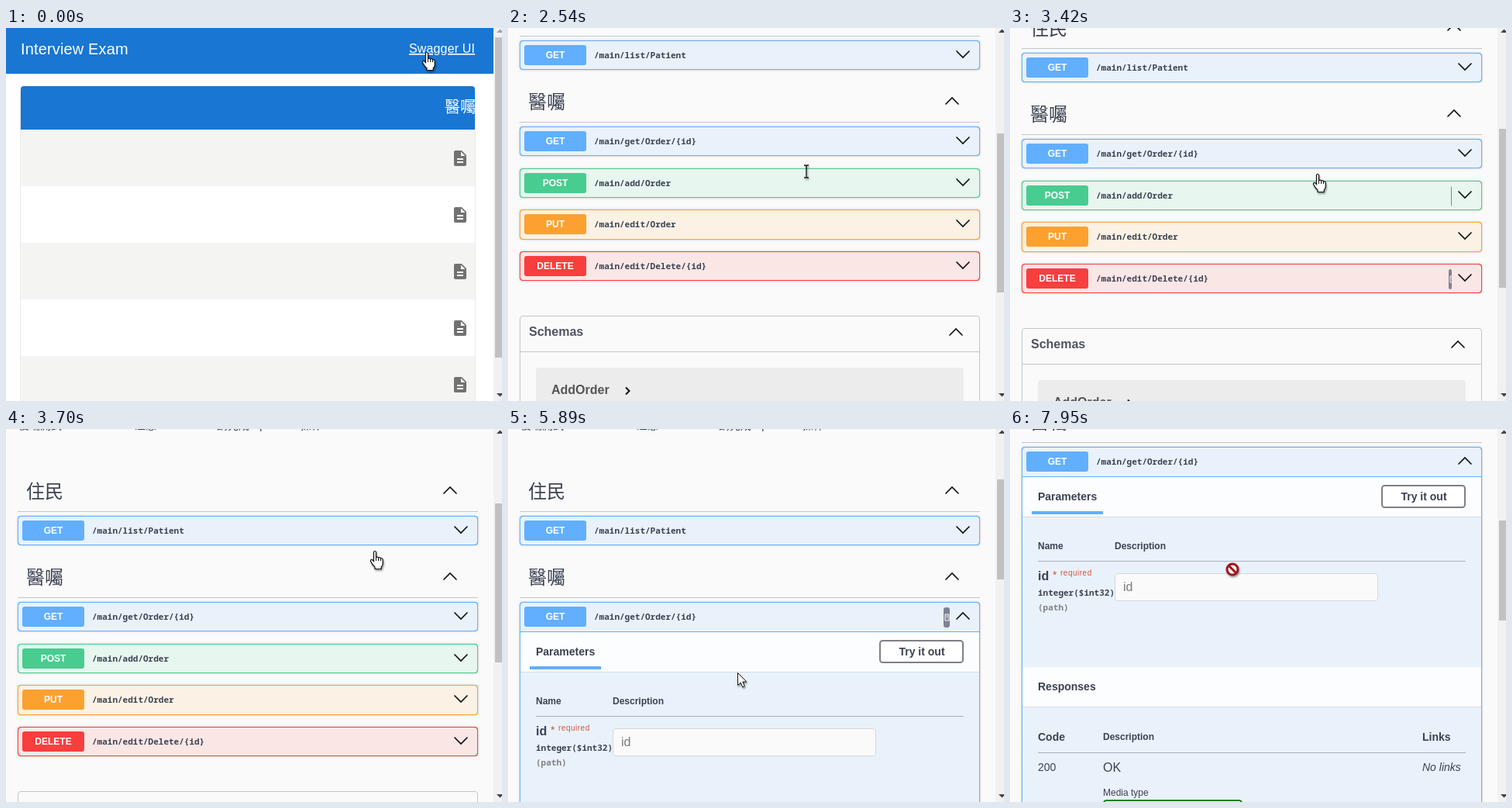
Write an HTML page that moves like this. It is 640x481 px and loops after 8000 ms.

```html
<!DOCTYPE html>
<html lang="zh-Hant">
<head>
<meta charset="utf-8">
<title>API walkthrough</title>
<style>
html, body { margin: 0; width: 100%; height: 100%; overflow: hidden; }
svg { display: block; }
text { font-family: "Liberation Sans", Arial, "Noto Sans CJK TC", "Noto Sans CJK", sans-serif; fill: #3b4151; white-space: pre; }
.b { font-weight: 700; }
.i { font-style: italic; }
.m { font: 600 11px "Noto Sans Mono", "DejaVu Sans Mono", monospace; }
.row { filter: drop-shadow(0 0 1.5px #0003); }
#cursor { filter: drop-shadow(1.5px 2px 1px #0006); }
</style>
</head>
<body>
<svg id="stage" width="640" height="481"></svg>
<script>
const rect = (x, y, w, h, fill, more = '') =>
  `<rect x="${x}" y="${y}" width="${w}" height="${h}" fill="${fill}" ${more}/>`;
const text = (x, y, size, s, cls = '', more = '') =>
  `<text x="${x}" y="${y}" class="${cls}" style="font-size:${size}px;${more}">${s}</text>`;
const chevron = (x, y, dir, id = '') =>
  `<path ${id && `id="${id}"`} d="M${x - 8} ${y - 4 * dir}l8 ${8 * dir} 8 ${-8 * dir}" fill="none" stroke="#111" stroke-width="1.7" stroke-linecap="round"/>`;
const frame = (x, y, w, h, stroke, fill, width = 1, more = '') =>
  rect(x + width / 2, y + width / 2, w - width, h - width, fill, `rx="3.5" stroke="${stroke}" stroke-width="${width}" ${more}`);
const group = (id, body) => `<g id="${id}">${body}</g>`;

const BLUE = '#61affe', GREEN = '#49cc90', ORANGE = '#fca130', RED = '#f93e3e';
const LINE = '#c3c5c9';

// Landing page
const docIcon = 'M14 2H6c-1.1 0-2 .9-2 2v16c0 1.1.9 2 2 2h12c1.1 0 2-.9 2-2V8l-6-6zm2 16H8v-2h8v2zm0-4H8v-2h8v2zm-3-5V3.5L18.5 9H13z';
function landing() {
  let s = rect(0, 0, 629, 481, '#fff') + rect(0, 0, 629, 59, '#1976d2') +
    text(19, 34, 20, 'Interview Exam', '', 'fill:#fff;letter-spacing:.15px') +
    text(520, 32, 16, 'Swagger UI', '', 'fill:#fff;letter-spacing:.15px;text-decoration:underline') +
    rect(18, 78, 588, 420, '#ebebeb', 'rx="4"') +
    rect(19, 75, 586, 80, '#1976d2', 'rx="4"') +
    `<svg width="605" height="481">${text(566, 109, 20, '醫囑', '', 'fill:#fff')}</svg>`;
  for (let i = 0; i < 5; i++) {
    const y = 131 + 73 * i;
    s += rect(19, y, 586, 73, i % 2 ? '#fff' : '#f4f4f2') + rect(19, y + 73, 586, 1, '#e0e0e0') +
      `<path transform="translate(574 ${y + 25})" d="${docIcon}" fill="#727272"/>`;
  }
  return s;
}

// API page
const copyButton = (id, y) =>
  `<svg id="${id}" y="${y + 7}" width="0" height="26">${rect(0, 0, '100%', 26, '#7d8293', 'rx="3"')}
  <path d="M2 9h5v8h-5zM3.5 11h2M3.5 13h2" fill="none" stroke="#fff"/></svg>`;
const method = (y, color, name, path, id, h = 38) =>
  frame(15, y, 594, h, color, '#fafafa', 1, `class="row ${id}-box"`) +
  frame(15, y, 594, h, color, color + '1c', 1, `class="${id}-box"`) +
  rect(21, y + 6, 80, 26, color, 'rx="3"') +
  text(61, y + 23, 12, name, 'b', 'fill:#fff;text-anchor:middle') +
  text(111, y + 23, 11, path, 'm') +
  chevron(587, y + 18, 1, id + '-chevron') + copyButton(id + '-copy', y);
const section = (y, name) =>
  text(26, y, 24, name, '', 'font-weight:500') + chevron(573, y - 10, -1) + rect(15, y + 17, 594, 1, LINE);
const band = (y, title) =>
  rect(16, y + 1, 592, 51, '#d3dde6') + rect(16, y, 592, 51, '#fcfdff') + text(36, y + 30, 14, title, 'b');

const intro = rect(0, 0, 629, 59, '#1b1b1b') + '<circle cx="36" cy="29" r="18" fill="#85ea2d"/>' +
  text(16, 142, 36, 'Interview Exam', 'b') +
  rect(278, 112, 34, 18, '#7d8492', 'rx="9"') + text(295, 125, 11, 'v1', 'b', 'fill:#fff;text-anchor:middle') +
  text(16, 166, 12, '/swagger/v1/swagger.json', '', 'fill:#4990e2') +
  text(16, 200, 14, '後端測試') + text(166, 200, 14, '注意') +
  text(272, 200, 14, '請完成 Api') + text(380, 200, 14, '操作');

const details = band(462, 'Parameters') + rect(28, 506, 92, 4, BLUE) +
  frame(479, 472, 109, 30, '#7f7f85', '#fff', 2) + text(534, 492, 14, 'Try it out', 'b', 'text-anchor:middle') +
  text(36, 555, 12, 'Name', 'b') + text(135, 555, 12, 'Description', 'b') + rect(36, 570, 552, 1, '#a9b2bc') +
  text(36, 595, 16, 'id', 'b') + text(55, 593, 14, '*', '', 'fill:#d4553f') +
  text(65, 589, 10, 'required', '', 'fill:#d4553f;letter-spacing:.5px') +
  text(36, 615, 11, 'integer($int32)', 'm') + text(36, 634, 11, '(path)', 'm i', 'fill:#808080') +
  frame(135, 586, 340, 36, '#d6d8da', '#fafafa') + text(146, 609, 16, 'id', '', 'fill:#7b7b7b') +
  band(707, 'Responses') + text(36, 802, 14, 'Code', 'b') + text(120, 801, 12, 'Description', 'b') +
  text(532, 802, 14, 'Links', 'b') + rect(36, 817, 552, 1, '#a9b2bc') +
  text(36, 841, 14, '200') + text(120, 842, 16, 'OK') + text(532, 841, 14, 'No links', 'i') +
  text(120, 873, 12, 'Media type') + frame(120, 878, 180, 32, '#008000', '#f7f7f7', 2);

const below = method(477, GREEN, 'POST', '/main/add/Order', 'post') +
  method(530, ORANGE, 'PUT', '/main/edit/Order', 'put', 39) +
  method(584, RED, 'DELETE', '/main/edit/Delete/{id}', 'delete') +
  frame(15, 667, 594, 400, LINE, 'none') + text(27, 693, 16, 'Schemas', 'b', 'fill:#505461') +
  chevron(578, 688, -1) + rect(15, 713, 594, 1, LINE) + rect(36, 734, 552, 60, '#ececec', 'rx="4"') +
  text(56, 768, 16, 'AddOrder', 'b', 'fill:#555') +
  '<path d="M152 759.500l4.500 4.500-4.500 4.500" fill="none" stroke="#111" stroke-width="2"/>';

const spinner = '<path d="M325 542a13 13 0 1 1-13-13" fill="none" stroke="#555" stroke-width="3"/>';
const api = rect(0, 0, 629, 481, '#fafafa') + group('scroller', intro + section(289, '住民') +
  method(312, BLUE, 'GET', '/main/list/Patient', 'list') + section(400, '醫囑') +
  method(423, BLUE, 'GET', '/main/get/Order/{id}', 'get') +
  group('open', rect(15, 461, 594, 1, BLUE) + group('details', details) + group('spinner', spinner)) +
  group('below', below));

const scrollbar = rect(629, 0, 11, 481, '#f1f1f1') + '<rect id="thumb" x="631" width="9" fill="#c1c1c1"/>' +
  '<path id="up" d="M633 6l4.500-4.500 4.500 4.500z"/><path d="M633 471h9l-4.500 4.500z" fill="#444"/>';

const cursors = {
  hand: '<path d="M-1.500 1.500q1.500-2.500 3 0V8.500q2-1 3 .5 2-.8 3 .8 2.500-.4 2.700 2V17q-.4 2.500-2 4v2.500H0V21q-3.500-3-5.500-7.500-.2-2.500 2-2l2 2z" fill="#fff" stroke="#111" stroke-width="1.200"/><path d="M1.500 8v5M4.500 9v4M7.500 10v3" stroke="#111"/>',
  arrow: '<path d="M.5.5V16.500l3.700-3.500 2.500 5.800 2.600-1.100-2.500-5.700h5z" fill="#fff" stroke="#111"/>',
  beam: '<path d="M-3-8h2l1 1 1-1h2M0-7V7M-3 8h2l1-1 1 1h2" fill="none" stroke="#111" stroke-width="1.300"/>',
  blocked: '<circle r="7" fill="#fff" stroke="#a5121a" stroke-width="3"/><path d="M-5-5L5 5" stroke="#a5121a" stroke-width="3"/>'
};

const stage = document.getElementById('stage');
stage.innerHTML = group('landing', landing()) + group('api', api) + scrollbar +
  group('cursor', Object.entries(cursors).map(([id, shape]) => group(id, shape)).join(''));
const $ = id => document.getElementById(id);
const show = (id, on) => $(id).setAttribute('display', on ? 'inline' : 'none');
const move = (id, x, y) => $(id).setAttribute('transform', `translate(${x} ${y})`);

// Each key is [time, value, ...]; values are linear in between.
function at(keys, t, n = 1) {
  const i = keys.findIndex(k => k[0] > t);
  if (i < 0) return keys[keys.length - 1][n];
  if (!i) return keys[0][n];
  const a = keys[i - 1], b = keys[i];
  return a[n] + (b[n] - a[n]) * (t - a[0]) / (b[0] - a[0]);
}

const scrollKeys = [[2539, 0], [2540, 296], [2610, 300], [3370, 300], [3420, 280], [3600, 200],
  [6500, 200], [6580, 373], [6680, 400]];
const cursorKeys = [[1600, 543, 31], [2410, 385, 185], [3050, 385, 185], [3230, 392, 296], [3420, 397, 188],
  [3770, 495, 150], [3870, 495, 150], [4400, 591, 237], [5420, 591, 237], [5890, 296, 313], [6050, 230, 398],
  [6240, 187, 372], [6500, 190, 372], [6580, 190, 356], [7280, 181, 212], [7300, 181, 212],
  [7700, 240, 180], [7950, 287, 181]];
const copyKeys = {
  get: [[4370, 0], [4400, 3], [4720, 3], [5080, 18], [5700, 18], [5890, 8], [6360, 0]],
  post: [[3380, 0], [3420, 1], [3480, 0]],
  delete: [[3150, 0], [3250, 9], [3420, 4], [3600, 0]]
};

function draw(t) {
  const onApi = t >= 1370, opened = t >= 4790, loaded = t >= 5260;
  const scroll = Math.round(at(scrollKeys, t));
  const extra = loaded ? 634 : opened ? 160 : 0;

  show('landing', !onApi);
  show('api', onApi);
  show('open', opened);
  show('details', loaded);
  show('spinner', !loaded);
  $('spinner').setAttribute('transform', `rotate(${t * 0.36} 312 542)`);
  move('scroller', 0, -scroll);
  move('below', 0, extra);
  document.querySelectorAll('.get-box').forEach(b => b.setAttribute('height', 37 + extra));
  $('get-chevron').setAttribute('transform', opened ? 'rotate(180 587 441)' : '');
  for (const id in copyKeys) {
    const w = at(copyKeys[id], t);
    $(id + '-copy').setAttribute('width', w);
    $(id + '-copy').setAttribute('x', 570 - w);
  }

  const height = onApi ? 1086 + extra : 539;
  $('thumb').setAttribute('y', Math.round(12 + scroll * 456 / height));
  $('thumb').setAttribute('height', Math.round(222630 / height));
  $('up').setAttribute('fill', scroll ? '#444' : '#a3a3a3');

  const kind = t < 1650 ? 'hand' : t < 2540 ? 'arrow' : t < 3070 ? 'beam' :
    t < 5650 ? 'hand' : t < 7230 ? 'arrow' : 'blocked';
  for (const id in cursors) show(id, id === kind);
  move('cursor', Math.round(at(cursorKeys, t)), Math.round(at(cursorKeys, t, 2)));
}

const start = performance.now();
function tick() {
  draw((performance.now() - start) % 8000);
  requestAnimationFrame(tick);
}
tick();
</script>
</body>
</html>
```
